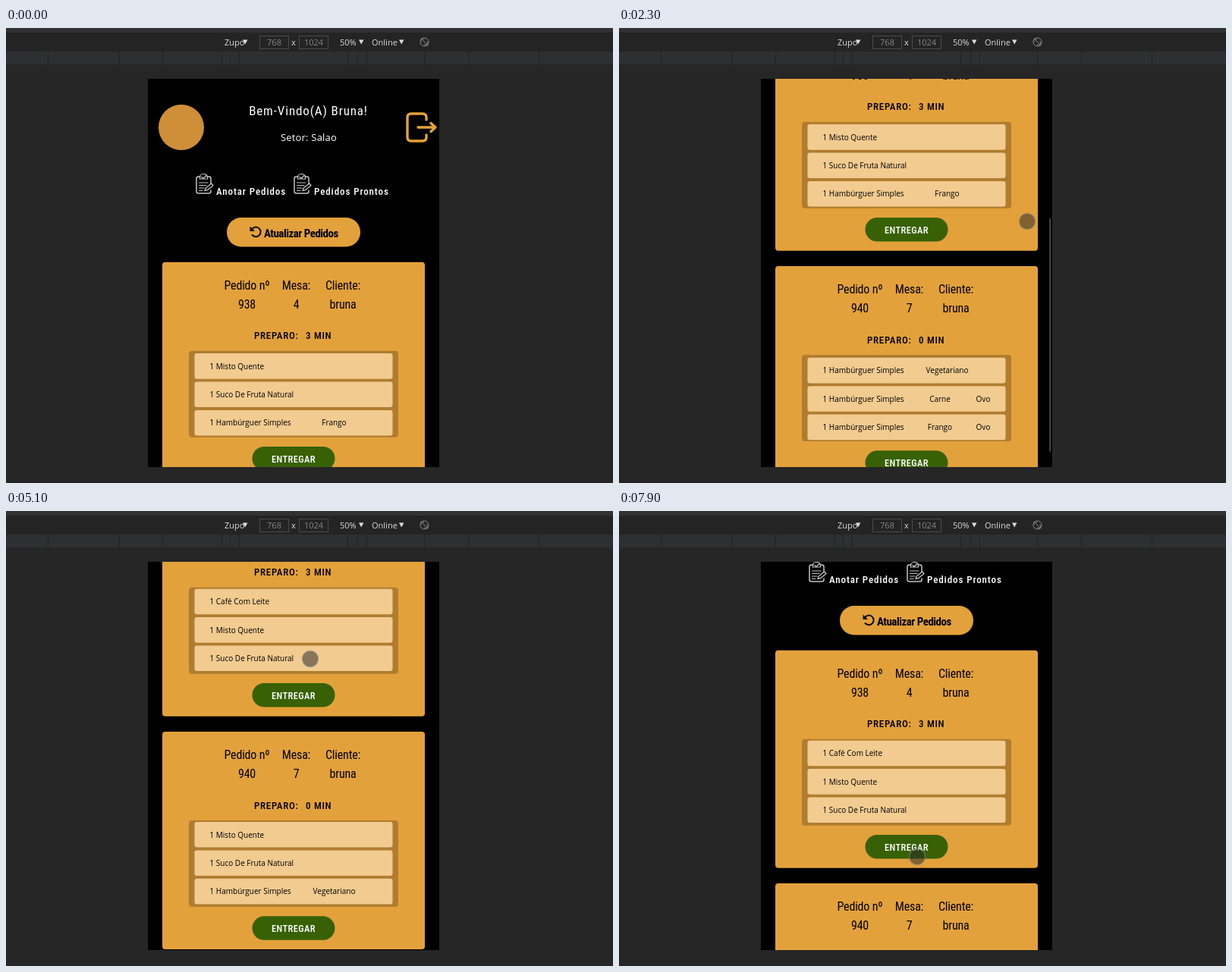
Write an HTML page that moves like this. It is 800 by 600 pixels and loops after 8000 ms.

```html
<!DOCTYPE html>
<html lang="pt">
<head>
<meta charset="utf-8">
<style>
html, body { margin: 0; width: 100%; height: 100%; overflow: hidden; background: #262626; }
svg { display: block; }
text { font-family: "Open Sans", sans-serif; white-space: pre; }
.narrow { font-family: "Roboto Condensed", Roboto, sans-serif; font-stretch: 75%; }
.mid { text-anchor: middle; }
.tool { font-size: 11px; fill: #dcdcdc; }
.hello { font-size: 17px; letter-spacing: .85px; fill: #fff; }
.sector { font-size: 13px; letter-spacing: .2px; fill: #fff; }
.menu { font-size: 13px; font-weight: 500; letter-spacing: .9px; fill: #fff; }
.refresh { font-size: 15px; font-weight: 700; letter-spacing: -.5px; }
.label { font-size: 16px; letter-spacing: -.2px; }
.prep { font-size: 13px; font-weight: 500; letter-spacing: .7px; }
.deliver { font-size: 12.5px; font-weight: 500; letter-spacing: .4px; fill: #fff; }
.item { font-size: 10px; }
</style>
</head>
<body>
<svg id="stage" width="800" height="600" viewBox="0 0 800 600"></svg>
<script>
const GOLD = '#e3a13b', DURATION = 8000, STEP = 100;
const ROW = 37.4, LIST_HEIGHT = 114, PAGE_RATIO = 0.605;

const rect = (x, y, w, h, fill, r = 0, extra = '') =>
  `<rect x="${x}" y="${y}" width="${w}" height="${h}" rx="${r}" fill="${fill}" ${extra}/>`;
const text = (x, y, cls, str) => `<text x="${x}" y="${y}" class="${cls}">${str}</text>`;
const line = (d, color, width) =>
  `<path d="${d}" fill="none" stroke="${color}" stroke-width="${width}" stroke-linecap="round" stroke-linejoin="round"/>`;

function toolbar() {
  const arrow = x => `<path d="M${x} 15.5h6.4l-3.2 6z" fill="#dcdcdc"/>`;
  const field = (x, value) =>
    rect(x + .5, 10.5, 38, 17, '#242424', 0, 'stroke="#4a4a4a"') +
    `<text x="${x + 19.5}" y="23" class="tool mid" style="fill:#858585">${value}</text>`;
  const ticks = [55, 149, 206, 284, 295, 307, 450, 463, 475, 551, 609, 702];
  return rect(0, 0, 800, 6, '#323232') + rect(0, 6, 800, 25, '#242424') +
    rect(0, 31, 800, 17, '#2e2f31') +
    ticks.map(x => rect(x, 31, 1, 17, '#222')).join('') +
    text(288, 23, 'tool', 'Zupo') + arrow(312) +
    field(334, 768) + text(376, 23, 'tool', 'x') + field(386, 1024) +
    text(440, 23, 'tool', '50%') + arrow(465) +
    text(482, 23, 'tool', 'Online') + arrow(518) +
    line('M547 14l9 9M547 18a2 2 0 0 1 4-3M555 18a2 2 0 0 1-4 4', '#8a8a8a', 1) +
    '<circle cx="551.5" cy="18.5" r="5.5" fill="none" stroke="#8a8a8a"/>';
}

function clipboard(x, y) {
  return `<g transform="translate(${x} ${y})">` +
    line('M6 4H3.5Q1 4 1 6.500V23.500Q1 26 3.500 26H17.500Q20 26 20 23.500V22M15 4H17.500Q20 4 20 6.500V13', '#c4c4c4', 1.5) +
    line('M5.500 7V4.500A5 4 0 0 1 15.500 4.500V7ZM8 4.500l2 2 3.500-3.500M4.500 12H16M4.500 15.500H14M4.500 19H11M4.500 22.500H9', '#c4c4c4', 1.2) +
    line('M12 22.500l1.200-3.500 7.500-6 2.300 2.500-7.500 6.200z', '#c4c4c4', 1.3) + '</g>';
}

function header() {
  return `<circle cx="231" cy="131" r="30" fill="#cf8f38"/>` +
    text(398.5, 115, 'narrow mid hello', 'Bem-Vindo(A) Bruna!') +
    text(399, 149, 'mid sector', 'Setor: Salao') +
    line('M554 121V118Q554 113 549 113H534Q529 113 529 118V144Q529 149 534 149H549Q554 149 554 144V141M543 131H566M560 125.500L566 131L560 136.500', GOLD, 3.4) +
    clipboard(250, 192) + text(277, 219.5, 'narrow menu', 'Anotar Pedidos') +
    clipboard(379, 192) + text(406, 219.5, 'narrow menu', 'Pedidos Prontos') +
    rect(291, 250, 176, 38.5, GOLD, 19) +
    line('M324 265.500A6.300 6.300 0 1 1 324.500 273', '#111', 2) +
    '<path d="M321.500 261.500v6.500h6.500z" fill="#111"/>' +
    text(340, 275.5, 'narrow refresh', 'Atualizar Pedidos');
}

function item([name, filling = '', extra = ''], i) {
  const y = 2 + ROW * i;
  return rect(7.5, y, 261, 33.6, '#f2cb90', 3) + text(27.5, y + 20.6, 'item', name) +
    text(extra ? 182 : 191.5, y + 20.6, 'item mid', filling) +
    text(239, y + 20.6, 'item mid', extra);
}

function card(id, top, number, table, minutes, items) {
  const thumb = LIST_HEIGHT ** 2 / (items.length * ROW);
  return `<g transform="translate(0 ${top})">` +
    rect(206, 0, 346, 287, GOLD, 4) +
    [[317.5, 'Pedido nº', number], [382.5, 'Mesa:', table], [444, 'Cliente:', 'bruna']]
      .map(([x, label, value]) =>
        text(x, 36, 'narrow mid label', label) + text(x, 61, 'narrow mid label', value)).join('') +
    text(327, 101.5, 'narrow prep', 'PREPARO:') + text(395, 101.5, 'narrow prep', minutes + ' MIN') +
    rect(241, 117, 276, LIST_HEIGHT, '#b07d30', 4) +
    `<svg x="241" y="117" width="276" height="${LIST_HEIGHT}">` +
    `<g id="list${id}">${items.map(item).join('')}</g>` +
    rect(273, 0, 1.5, thumb, '#8c8578', .7, `id="bar${id}"`) + '</svg>' +
    rect(324.5, 243.3, 109, 31.5, '#386105', 15.75) +
    text(379, 264, 'narrow mid deliver', 'ENTREGAR') + '</g>';
}

const burger = 'Hambúrguer Simples';
const drinks = [['1 Misto Quente'], ['1 Suco De Fruta Natural']];
document.getElementById('stage').innerHTML =
  rect(0, 0, 800, 600, '#262626') + toolbar() +
  '<svg x="187" y="67" width="384" height="512" viewBox="187 67 384 512">' +
  rect(187, 67, 384, 512, '#000') + '<g id="page">' + header() +
  card(1, 308.7, 938, 4, 3, [['1 Café Com Leite'], ...drinks, ['1 ' + burger, 'Frango']]) +
  card(2, 616, 940, 7, 0, [...drinks, ['1 ' + burger, 'Vegetariano'],
    ['1 ' + burger, 'Carne', 'Ovo'], ['1 ' + burger, 'Frango', 'Ovo']]) +
  '</g>' + rect(567.3, 68, 1.8, 308, '#4e4e4e', .9, 'id="pageBar"') + '</svg>' +
  '<circle id="touch" r="10.5" fill="#282828" fill-opacity=".53" stroke="#8a8a8a" stroke-opacity=".5" stroke-width="1.5"/>';

// Each track lists [time, ...values], joined by straight segments.
const tracks = {
  page: [[1300, 0], [1500, 74], [2300, 302], [2700, 325], [6200, 325], [6800, 205], [7100, 125]],
  pageBar: [[1300, 0], [1400, 1], [2800, 1], [3100, 0], [6200, 0], [6300, 1], [7300, 1], [7600, 0]],
  list1: [[4300, 36], [4400, 25], [4500, 8], [4600, 0]],
  bar1: [[4300, 0], [4400, 1], [4800, 1], [5100, 0]],
  list2: [[3300, 73], [3400, 71], [3500, 28], [3600, 0]],
  bar2: [[3300, 0], [3400, 1], [4000, 1], [4300, 0]],
  touch: [[600, 85, 556], [1000, 330, 15], [1200, 538, 255], [2300, 538, 255], [2700, 425, 453],
    [4000, 425, 453], [4100, 350, 545], [4200, 256, 400], [4300, 401, 195], [5100, 401, 195],
    [5300, 510, 252], [5400, 510, 252], [5600, 399, 545], [5800, 596, 400], [6000, 567, 307],
    [7000, 567, 307], [7100, 545, 290], [7300, 291, 97], [7600, 410, 445], [7700, 410, 445], [7900, 393, 456]]
};

function sample(name, t) {
  const keys = tracks[name];
  const next = keys.findIndex(key => key[0] > t);
  if (next === 0) return keys[0].slice(1);
  if (next < 0) return keys[keys.length - 1].slice(1);
  const a = keys[next - 1], b = keys[next], k = (t - a[0]) / (b[0] - a[0]);
  return a.slice(1).map((v, i) => v + (b[i + 1] - v) * k);
}

const el = id => document.getElementById(id);
const move = (id, x, y) => el(id).setAttribute('transform', `translate(${x} ${y})`);
const fade = (id, t) => el(id).setAttribute('opacity', sample(id, t)[0]);

function draw(now) {
  const t = Math.floor(now % DURATION / STEP) * STEP;
  const scroll = sample('page', t)[0];
  move('page', 0, -scroll);
  move('pageBar', 0, scroll * PAGE_RATIO);
  fade('pageBar', t);
  for (const id of [1, 2]) {
    const offset = sample('list' + id, t)[0];
    move('list' + id, 0, -offset);
    move('bar' + id, 0, offset * .61);
    fade('bar' + id, t);
  }
  move('touch', ...sample('touch', t));
  el('touch').setAttribute('visibility', t < 600 ? 'hidden' : 'visible');
}

const start = performance.now();
function tick() {
  draw(performance.now() - start);
  requestAnimationFrame(tick);
}
tick();
</script>
</body>
</html>
```
